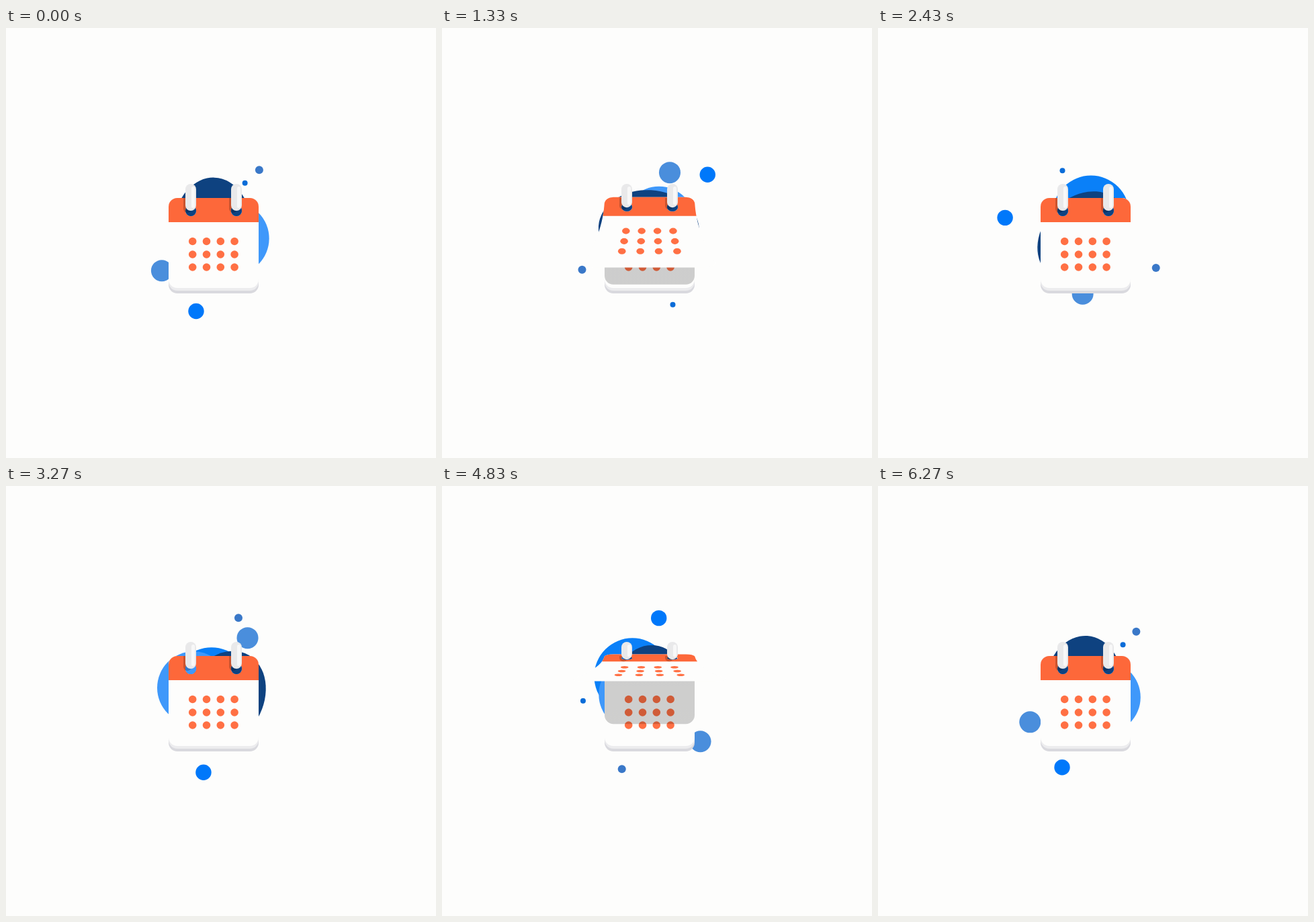
An HTML page with a canvas that plays this animation: 640x640 px, repeating every 6.31 s.

```html
<!DOCTYPE html>
<html lang="en">
<head>
<meta charset="utf-8">
<title>Calendar</title>
<style>
html, body { margin: 0; width: 100%; height: 100%; overflow: hidden; background: #fdfdfc; }
canvas { display: block; width: 640px; height: 640px; }
</style>
</head>
<body>
<canvas id="stage" width="640" height="640"></canvas>
<script>
const ctx = document.getElementById('stage').getContext('2d');
const LOOP = 6310, FLIP = 3200, TAU = Math.PI * 2, RAD = Math.PI / 180;
const PAPER = '#fdfdfc', ORANGE = '#fd683a', DOT = '#ff7044';
const PAGE = { x: 242, y: 253, w: 134, h: 134, r: 13, mid: 309 };
const RINGS = [275, 343];
const LIFT = 780, OVER = 1930, GONE = 2150;

// A looping value: mean plus waves given as [amplitude, cycles per loop, time of peak].
const wave = (mean, ...parts) => t => parts.reduce(
  (sum, [amp, cycles, peak]) => sum + amp * Math.cos(TAU * cycles * (t - peak) / LOOP), mean);
const clamp = v => Math.min(1, Math.max(0, v));

const ORBITS = [
  { color: '#3a78c8', size: 6, turns: 2, dist: wave(117.3, [3.6, 1, 4830]), angle: wave(-57, [2.3, 1, 700]) },
  { color: '#0a6cd8', size: 4, turns: 3, dist: wave(95, [9, 1, 900], [13.5, 2, 1900]), angle: wave(-65, [11, 1, 1500], [6, 2, 2840]) },
  { color: '#0078fa', size: 11.7, turns: 2, dist: wave(118.3, [6.3, 1, 1850]), angle: wave(107.2, [3.8, 1, 3400]) },
  { color: '#4a8edc', size: 16, turns: 3, dist: wave(97, [5, 1, 4800], [6, 2, 1040]), angle: wave(148.5, [3.5, 1, 900], [5, 2, 1735]) }
];

const BLOBS = [
  { color: '#0a80f8', rx: 57, ry: 57, x: wave(309, [21, 1, 1200], [7, 2, 0]), y: wave(294, [6, 1, 500], [17, 2, 631]) },
  { color: '#3f98fa', rx: 54, ry: 54, x: wave(309, [25, 1, 900], [13, 3, 0]), y: wave(304, [9, 1, 5400], [12, 2, 2524]) },
  { color: '#0e4280', rx: 75, ry: 58, x: wave(311, [8, 1, 3600], [11, 2, 631]), y: wave(307, [11, 1, 3700]), tilt: wave(52, [32, 1, 6000], [10, 2, 0]) }
];

function ellipse(x, y, rx, ry, color, tilt = 0) {
  ctx.beginPath();
  ctx.ellipse(x, y, rx, ry, tilt, 0, TAU);
  ctx.fillStyle = color;
  ctx.fill();
}

function box(x, y, w, h, r, color) {
  ctx.beginPath();
  ctx.roundRect(x, y, w, h, r);
  ctx.fillStyle = color;
  ctx.fill();
}

function drawBlobs(t) {
  for (const { color, rx, ry, x, y, tilt } of BLOBS)
    ellipse(x(t), y(t), rx, ry, color, tilt ? (tilt(t) - 180 * t / LOOP) * RAD : 0);
}

function drawOrbits(t) {
  for (const { color, size, turns, dist, angle } of ORBITS) {
    const a = angle(t) * RAD - turns * TAU * t / LOOP;
    ellipse(310 + dist(t) * Math.cos(a), 308 + dist(t) * Math.sin(a), size, size, color);
  }
}

function drawDots(place, squash) {
  for (const y of [317.5, 337, 356])
    for (let i = 0; i < 4; i++) {
      const [px, py] = place(277.7 + i * 20.8, y - PAGE.y);
      ellipse(px, py, 5.8, 5.8 * squash, DOT);
    }
}

function drawBase() {
  const { x, y, w, r } = PAGE;
  box(x, y, w, 142, r, '#d9d9de');
  box(x, y, w, 138, r, '#ececee');
  box(x, y, w, 134, r, PAPER);
  box(x, y, w, 36, [r, r, 0, 0], ORANGE);
  drawDots((px, d) => [px, y + d], 1);
}

function drawShadow(angle) {
  const h = PAGE.h * (1 - .55 * (angle / 96) ** 2.9);
  if (h <= 36) return;
  const late = clamp((angle - 72) / 24), r = PAGE.r + 9 * late;
  const fill = ctx.createLinearGradient(0, 289, 0, PAGE.y + h);
  fill.addColorStop(0, 'rgba(0,0,0,.19)');
  fill.addColorStop(1, `rgba(0,0,0,${.19 - .15 * late})`);
  box(PAGE.x, 289, PAGE.w, h - 36, [0, 0, r, r], fill);
}

function drawPage(angle) {
  const c = Math.cos(angle * RAD), top = PAGE.y - angle / 28;
  const spread = Math.sin(angle * RAD) * clamp((105 - angle) / 25);
  const place = (x, d) => [PAGE.mid + (x - PAGE.mid) * (1 + 4.8e-5 * d * d * spread), top + d * c];
  const sheet = (end, color, r) => {
    const left = [], right = [];
    for (let d = 0; d <= end; d++) {
      const edge = r - Math.min(r, d, PAGE.h - d);
      const inset = r - Math.sqrt(r * r - edge * edge);
      left.push(place(PAGE.x + inset, d));
      right.unshift(place(PAGE.x + PAGE.w - inset, d));
    }
    ctx.beginPath();
    for (const p of [...left, ...right]) ctx.lineTo(...p);
    ctx.closePath();
    ctx.fillStyle = ctx.strokeStyle = color;
    ctx.fill();
  };
  if (c < 0) {
    sheet(PAGE.h, '#ff6e3e', 4);
    ctx.lineWidth = 3;
    ctx.lineJoin = 'round';
    ctx.stroke();
    return;
  }
  sheet(PAGE.h, PAPER, PAGE.r);
  sheet(36, ORANGE, PAGE.r);
  drawDots(place, c);
}

// The holes show what moves behind the calendar.
function drawHoles(t, y, squash) {
  ctx.save();
  ctx.beginPath();
  for (const x of RINGS) {
    ctx.moveTo(x + 8, y);
    ctx.ellipse(x, y, 8, 8 * squash, 0, 0, TAU);
  }
  ctx.clip();
  ctx.fillStyle = PAPER;
  ctx.fillRect(PAGE.x, 240, PAGE.w, 50);
  drawBlobs(t);
  ctx.restore();
}

function drawRings(bottom) {
  for (const x of RINGS) {
    box(x - 11, 253, 12, bottom - 250, [0, 0, 6, 6], 'rgba(0,0,0,.2)');
    box(x - 8, 232, 16, bottom - 232, 8, '#e9e9ea');
    box(x + 1, 236, 5, bottom - 240, 2.5, '#f8f8f8');
  }
}

function drawSwoosh(p) {
  if (p < 1660 || p > 1880) return;
  const head = 250 - (p - 1770) * .45;
  const length = 36 * Math.sin((p - 1660) / 220 * Math.PI);
  ctx.beginPath();
  for (let i = 0; i <= 12; i++) {
    const y = head + length * i / 12;
    ctx.lineTo(399 - ((y - 250) / 36) ** 2 * 11, y);
  }
  ctx.strokeStyle = '#ffb8a2';
  ctx.lineWidth = 6;
  ctx.lineCap = 'round';
  ctx.stroke();
}

function draw(t) {
  const p = t % FLIP, u = clamp((p - LIFT) / (OVER - LIFT));
  const angle = p < GONE ? 134 * (.55 * u + .45 * u ** 4) : 0;
  const lifted = angle > 0 && angle < 90;
  const c = lifted ? Math.cos(angle * RAD) : 1;
  const holeY = PAGE.y + 19 * c - (lifted ? angle / 28 : 0);

  ctx.fillStyle = PAPER;
  ctx.fillRect(0, 0, 640, 640);
  drawBlobs(t);
  drawOrbits(t);
  drawBase();
  if (angle > 0) drawShadow(angle);
  if (lifted) drawPage(angle);
  drawHoles(t, holeY, c);
  drawRings(holeY + 3 * (1 - c));
  if (angle >= 90) {
    ctx.globalAlpha = clamp((GONE - p) / 200);
    drawPage(angle);
    ctx.globalAlpha = 1;
  }
  drawSwoosh(p);
}

const start = performance.now();
function tick() {
  draw((performance.now() - start) % LOOP);
  requestAnimationFrame(tick);
}
tick();
</script>
</body>
</html>
```
